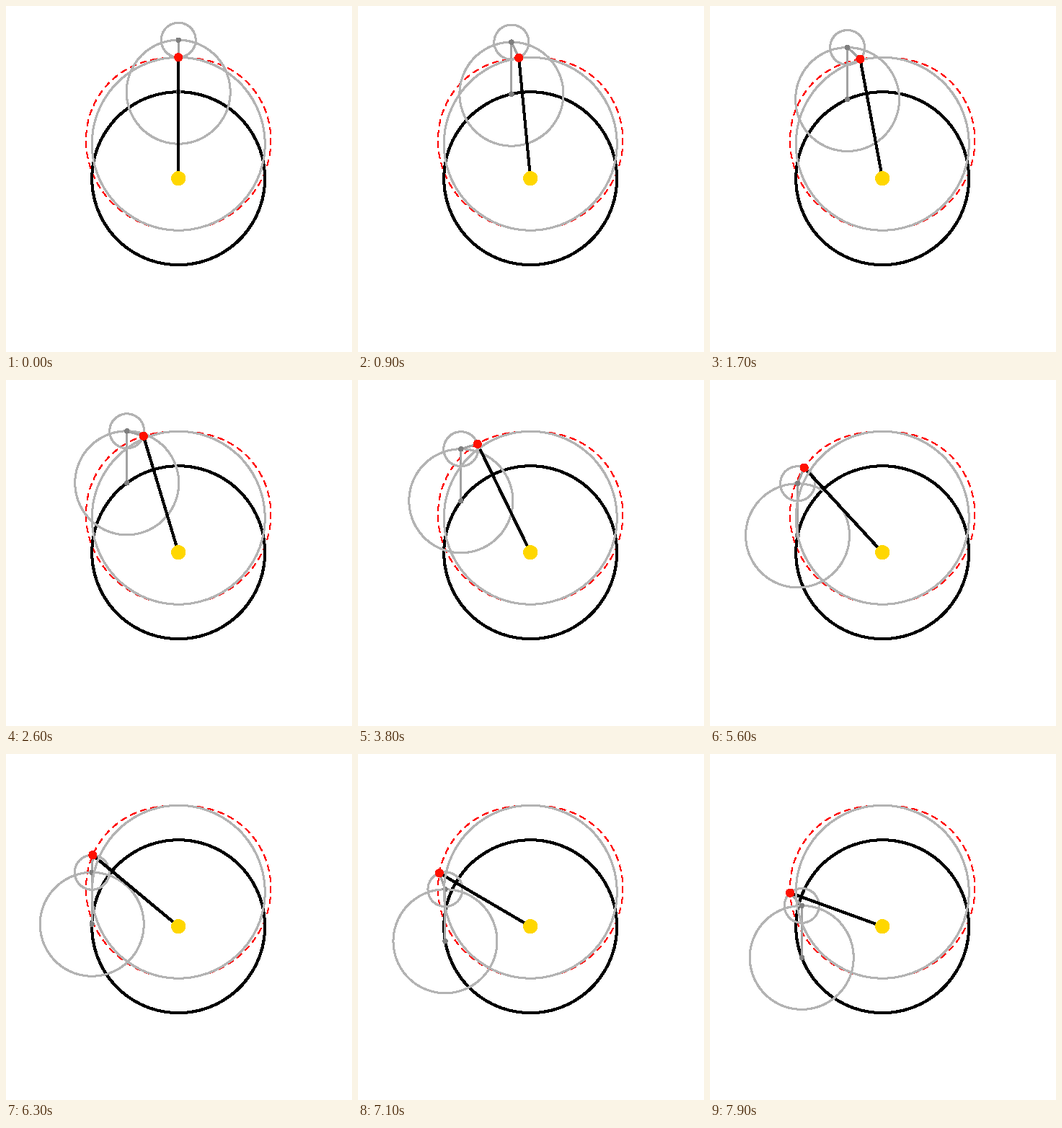
A matplotlib script for the animation above (8000 ms loop, 480 by 480 pixels).

```python
import matplotlib.pyplot as plt
import numpy as np
from matplotlib.animation import FuncAnimation
from matplotlib.patches import Circle

SIZE, DPI = 480, 96
PX = 72 / DPI
FRAMES, INTERVAL = 80, 100
STEPS_PER_TURN = 256

CENTER = np.array([239.2, 239.2])
R_DEFERENT, R_EPI, R_SMALL = 120, 72, 24
ECCENTRICITY = 48
LIGHT, MID, DARK = "#b3b3b3", "#a2a2a2", "#7f7f7f"

fig = plt.figure(figsize=(SIZE / DPI, SIZE / DPI), dpi=DPI, facecolor="white")
ax = fig.add_axes([0, 0, 1, 1])
ax.set_xlim(0, SIZE)
ax.set_ylim(SIZE, 0)
ax.axis("off")


def pose(a):
    """Epicycle centre, small epicycle centre and planet at angle a."""
    x0, y0 = CENTER
    epi = np.array([x0 - R_DEFERENT * np.sin(a), y0 - R_DEFERENT * np.cos(a)])
    small = np.array([epi[0], epi[1] - R_EPI])
    planet = np.array([small[0] + R_SMALL * np.sin(2 * a),
                       small[1] + R_SMALL * np.cos(2 * a)])
    return epi, small, planet


def ring(center, r, color, width, z):
    return ax.add_patch(Circle(center, r, fill=False, ec=color, lw=width * PX,
                               antialiased=False, zorder=z))


def dot(center, r, color, z):
    return ax.add_patch(Circle(center, r, fc=color, ec="none", lw=0,
                               antialiased=False, zorder=z))


def line(color, width, z, **kw):
    return ax.plot([], [], color=color, lw=width * PX, antialiased=False,
                   snap=False, zorder=z, solid_capstyle="round", **kw)[0]


# Fixed parts
orbit = line("red", 1, 1, dashes=(8, 6), dash_capstyle="butt")
orbit.set_data(*pose(np.linspace(0, 2 * np.pi, 721))[2])
ring(CENTER, R_DEFERENT, "black", 3, 2)
ring(CENTER - [0, ECCENTRICITY], R_DEFERENT, LIGHT, 2, 6)
dot(CENTER, 9.5, "#ffd700", 7)

# Moving parts
epi_ring = ring(CENTER, R_EPI, LIGHT, 2, 3)
small_ring = ring(CENTER, R_SMALL, LIGHT, 2, 3)
arm = line(MID, 2, 3.5)
epi_dot = dot(CENTER, 3.2, DARK, 4)
small_dot = dot(CENTER, 3.2, DARK, 4)
radius = line("black", 3, 5)
planet_dot = dot(CENTER, 5.5, "#ff1000", 8)


def update(i):
    epi, small, planet = pose(2 * np.pi * i / STEPS_PER_TURN)
    for part in (epi_ring, epi_dot):
        part.center = epi
    for part in (small_ring, small_dot):
        part.center = small
    planet_dot.center = planet
    arm.set_data(*zip(epi, small, planet))
    radius.set_data(*zip(CENTER, planet))
    return epi_ring, small_ring, arm, epi_dot, small_dot, radius, planet_dot


anim = FuncAnimation(fig, update, frames=FRAMES, interval=INTERVAL,
                     repeat=True, repeat_delay=0, blit=False)
plt.show()
```
